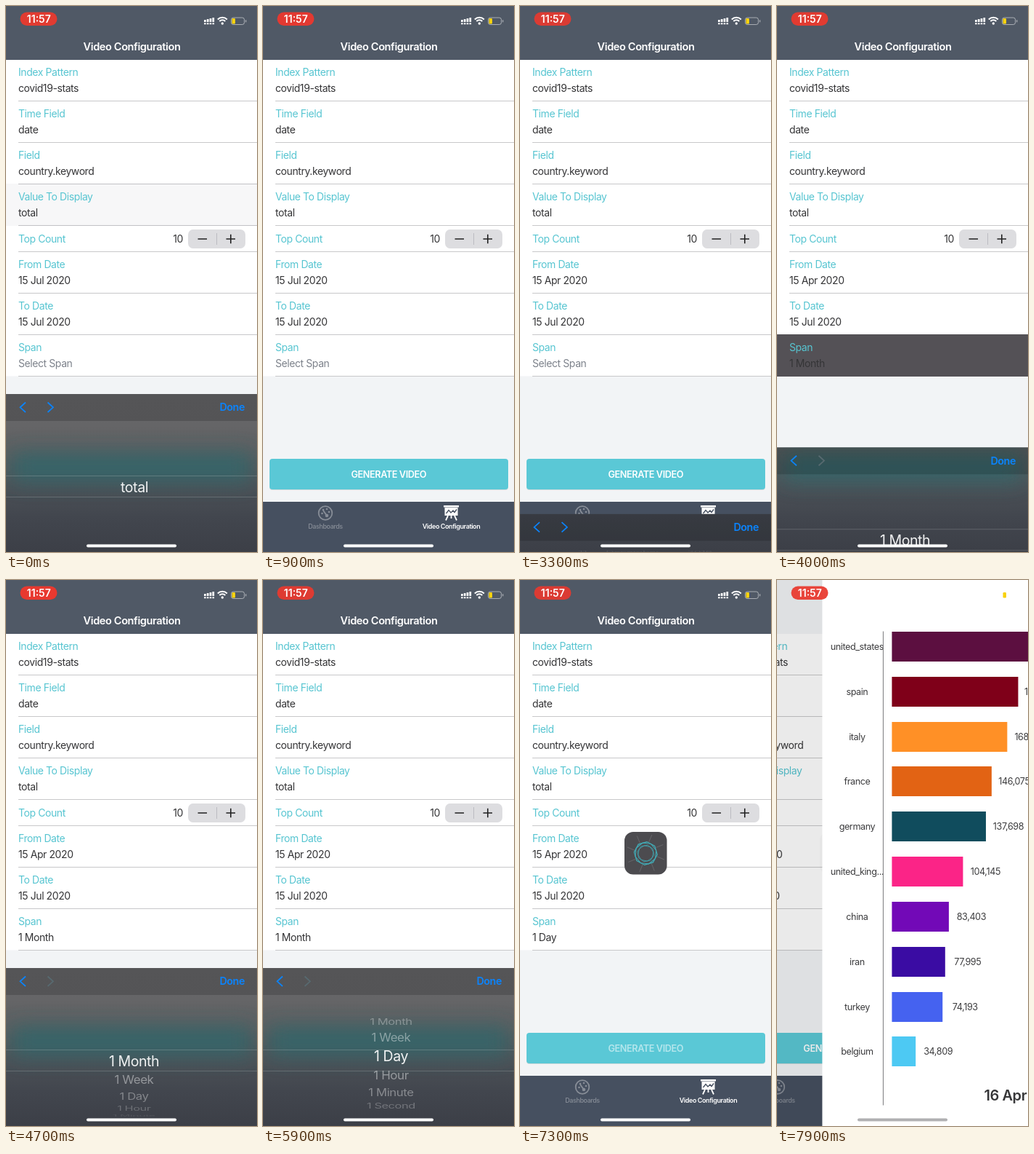
Write an HTML page that moves like this. It is 346x750 px and loops after 8 s.

```html
<!DOCTYPE html>
<html lang="en">
<head>
<meta charset="utf-8">
<title>Video Configuration</title>
<style>
html, body { margin: 0; width: 100%; height: 100%; overflow: hidden; background: #f2f4f6; }
svg { display: block; width: 346px; height: 750px; font-family: Inter, "Liberation Sans", sans-serif; letter-spacing: -.026em; }
</style>
</head>
<body>
<svg id="stage" viewBox="0 0 346 750" xmlns="http://www.w3.org/2000/svg"></svg>
<script>
const LOOP = 8000, W = 346, PANEL_H = 217, TEAL = '#57c5d1', BLUE = '#0a84ff';
const stage = document.getElementById('stage');
const clamp = (v, a = 0, b = 1) => Math.min(b, Math.max(a, v));
const ramp = (t, start, length) => clamp((t - start) / length);
const easeOut = (p, n) => 1 - (1 - p) ** n;
const smooth = p => p * p * (3 - 2 * p);

const rect = (x, y, w, h, fill, extra = '') =>
  `<rect x="${x}" y="${y}" width="${w}" height="${h}" fill="${fill}" ${extra}/>`;
const line = (d, color, width = 1, extra = '') =>
  `<path d="${d}" fill="none" stroke="${color}" stroke-width="${width}" ${extra}/>`;
const text = (s, x, y, size, fill, extra = '') =>
  `<text x="${x}" y="${y}" font-size="${size}" fill="${fill}" ${extra}>${s}</text>`;
const MID = 'text-anchor="middle"', END = 'text-anchor="end"', SEMI = 'font-weight="600"';

// Form rows: [label, top, initial value]
const rows = {
  index: ['Index Pattern', 74, 'covid19-stats'],
  time: ['Time Field', 131, 'date'],
  field: ['Field', 188, 'country.keyword'],
  value: ['Value To Display', 245, 'total'],
  from: ['From Date', 338, '15 Jul 2020'],
  to: ['To Date', 395, '15 Jul 2020'],
  span: ['Span', 452, 'Select Span'],
};

function formRow(id) {
  const [label, top, value] = rows[id];
  return line(`M17 ${top + 56.5}H${W}`, '#c8c8ca') +
    rect(0, top - 1, W, 58, '#545156', `id="${id}Glow" opacity="0"`) +
    text(label, 17, top + 22, 14, TEAL) +
    text(value, 17, top + 43.5, 14, '#353537', `id="${id}Text"`);
}

function form() {
  return rect(0, 74, W, 434.5, '#fff') + line(`M17 337.500H${W}`, '#c8c8ca') +
    Object.keys(rows).map(formRow).join('') +
    text('Top Count', 17, 325, 14, TEAL) + text('10', 244, 325, 14, '#353537', END) +
    rect(251, 307, 79, 26, '#dddde0', 'rx="7"') +
    line('M290.500 312V328', '#bcbcc1') +
    line('M264.500 320H277M303.500 320H316M309.800 313.800V326.200', '#222', 1.6);
}

function tabBar() {
  const grey = '#878d97';
  const dots = [[81.5, 697], [83, 692], [88, 691], [91, 695]]
    .map(([x, y]) => `<circle cx="${x}" cy="${y}" r="1.3" fill="${grey}"/>`).join('');
  return rect(0, 681, W, 69, '#465060') +
    `<circle cx="86" cy="696.5" r="9.3" fill="none" stroke="${grey}" stroke-width="1.8"/>` + dots +
    line('M83 693L88 700', grey, 2) + `<circle cx="88" cy="700" r="2.3" fill="${grey}"/>` +
    text('Dashboards', 86, 718, 9, grey, MID + ' font-weight="500"') +
    rect(249, 686, 21, 2.5, '#fff') + rect(250.5, 689, 18, 11, '#fff') +
    line('M252.500 697L256 692.500L259 696L262 693L264 695.500L267 691.500', '#465060', 1.4) +
    line('M255 700L252 706.500M259.500 700V704M264 700L267 706.500', '#fff', 1.8) +
    text('Video Configuration', 259.5, 718, 9, '#fff', MID + ' ' + SEMI);
}

function polygon(radius, turn) {
  return 'M' + Array.from({ length: 8 }, (_, i) => {
    const a = turn + i * Math.PI / 4;
    return `${(radius * Math.cos(a)).toFixed(2)} ${(radius * Math.sin(a)).toFixed(2)}`;
  }).join('L') + 'Z';
}

function loader() {
  let rays = '';
  for (let i = 0; i < 8; i++) rays += `<path d="M14 -8L24 -12" stroke="#77777b" stroke-width=".6" transform="rotate(${i * 45})"/>`;
  return `<g id="loader">${rect(144, 346, 58.5, 58.5, '#4c4b4f', 'rx="12"')}
    <g transform="translate(173.3 375.5)"><g id="spinner">${rays}
    ${line(polygon(16, .1), '#42aeb9', 1.2)}${line(polygon(15, .5), '#42aeb9', 1)}
    ${line(polygon(11.5, .2), '#42aeb9', .8)}${line(polygon(10.8, .6), '#42aeb9', .7)}</g></g></g>`;
}

function statusBar() {
  const bars = [0, 1, 2, 3].map(i =>
    rect(273 + i * 3.8, 19 - i, 2.7, 3 + i, '#fff', 'rx=".6"') +
    rect(273 + i * 3.8, 23.3, 2.7, 2, '#fff', 'rx=".6"')).join('');
  const arc = r => line(`M${298.3 - r * .72} ${25 - r * .72}A${r} ${r} 0 0 1 ${298.3 + r * .72} ${25 - r * .72}`, '#fff', 2);
  return rect(19.5, 8.5, 51, 18.5, '#e9392f', 'rx="9.2" id="pill"') +
    text('11:57', 45.3, 22.8, 14, '#fff', MID + ' letter-spacing="0" ' + SEMI) + bars + arc(9) + arc(5.5) +
    '<circle cx="298.3" cy="24" r="1.7" fill="#fff"/>' +
    rect(310.5, 16, 18, 9.5, 'none', 'rx="2.8" stroke="#fff" stroke-opacity=".5"') +
    rect(330, 19, 1.3, 3.5, '#fff', 'rx=".7" opacity=".5"') +
    rect(311.5, 17, 4.5, 7.5, '#f8d20e', 'rx="1.3"');
}

const countries = [
  ['united_states', 667801, '#5c0f40'], ['spain', 184948, '#7f0019'],
  ['italy', 168941, '#ff9026'], ['france', 146075, '#e26314'],
  ['germany', 137698, '#104c5d'], ['united_king...', 104145, '#fb2487'],
  ['china', 83403, '#7209b7'], ['iran', 77995, '#3a0ca3'],
  ['turkey', 74193, '#4562f0'], ['belgium', 34809, '#4dc9f3'],
];

function chart() {
  return rect(0, 0, W, 750, '#fff') + countries.map(([name, total, color], i) => {
    const y = Math.round(70.8 + i * 61.85), w = total * .000941;
    return text(name, 48, y + 25, 12.6, '#3c3c3e', MID) + rect(96, y, w, 41, color) +
      text(total.toLocaleString('en-US'), 96 + w + 31, y + 25, 12.6, '#3c3c3e', MID);
  }).join('') + line('M84 70.500V721.500', '#77777a') +
    text('16 Apr 2020', 223, 715, 20, '#363638', SEMI);
}

stage.innerHTML = `
<defs>
  <linearGradient id="shade" gradientUnits="userSpaceOnUse" x1="0" y1="533" x2="0" y2="750">
    <stop offset="0" stop-color="#666668"/><stop offset=".2" stop-color="#656567"/>
    <stop offset=".38" stop-color="#5b5e60"/><stop offset=".6" stop-color="#4b5056"/>
    <stop offset=".78" stop-color="#42464e"/><stop offset="1" stop-color="#3c3f47"/>
  </linearGradient>
  <filter id="blur" x="-30%" y="-200%" width="160%" height="500%"><feGaussianBlur stdDeviation="14"/></filter>
  <clipPath id="panelClip"><rect id="panelBox" x="0" y="533" width="346" height="217"/></clipPath>
</defs>
${rect(0, 0, W, 750, '#f2f4f6')}
<g id="oldPage">
  ${form()}
  ${rect(9, 623, 329, 42, '#8aa', 'rx="4" opacity=".35"')}
  ${rect(9, 622, 329, 42, '#5ac8d6', 'rx="4"')}
  ${text('GENERATE VIDEO', 173.3, 647.6, 12.7, '#fff', MID + ' ' + SEMI + ' id="generate"')}
  ${tabBar()}${loader()}
</g>
${rect(0, 0, W, 750, '#000', 'id="dim" opacity="0"')}
<g id="nav">${rect(0, 0, W, 74, '#505966')}${text('Video Configuration', 173.5, 60.5, 14.6, '#fff', MID + ' ' + SEMI)}</g>
<g id="panel" clip-path="url(#panelClip)">
  ${rect(0, 533, W, PANEL_H, 'url(#shade)')}
  ${rect(8, 614, 330, 40, '#30666b', 'filter="url(#blur)" opacity=".9"')}
  <g id="sheet">
    ${rect(0, 533, W, 37, '#000', 'opacity=".17"')}
    ${line('M27 544.500L19.500 551.300L27 558', BLUE, 1.7)}
    ${line('M57.500 544.500L65 551.300L57.500 558', BLUE, 1.7, 'id="next"')}
    ${text('Done', 329, 556.3, 14.3, BLUE, END + ' ' + SEMI + ' id="done"')}
    ${line(`M0 645.500H${W}M0 674.500H${W}`, '#fff', 1, 'opacity=".17"')}
    <g id="wheels"></g>
  </g>
</g>
<g id="chart">${chart()}</g>
${statusBar()}
${rect(111, 739.5, 124, 4, '#fff', 'rx="2" id="home"')}`;

const el = {};
stage.querySelectorAll('[id]').forEach(node => el[node.id] = node);
const set = (id, name, value) => el[id].setAttribute(name, value);
const show = (id, visible) => set(id, 'display', visible ? 'inline' : 'none');
const label = (id, value) => { if (el[id].textContent !== value) el[id].textContent = value; };

const months = ['January', 'February', 'March', 'April', 'May', 'June', 'July',
  'August', 'September', 'October', 'November', 'December'];
const spans = ['1 Month', '1 Week', '1 Day', '1 Hour', '1 Minute', '1 Second'];

// One column of the picker, wrapped on a cylinder
function wheel(item, pos, x, anchor) {
  let out = '';
  for (let i = Math.ceil(pos - 4.3); i <= pos + 4.3; i++) {
    const s = item(i);
    if (!s) continue;
    const d = i - pos, angle = d * .341, c = Math.cos(angle);
    const mid = Math.abs(d) < .5, k = 1 - .09 * (1 - c);
    const y = 660.5 + 77 * Math.sin(angle);
    out += `<g transform="translate(173 ${y.toFixed(2)}) scale(${k.toFixed(3)} ${(k * c).toFixed(3)})">` +
      text(s, x - 173, mid ? 7 : 6, mid ? 19.5 : 17, '#fff',
        `text-anchor="${anchor}" opacity="${mid ? .93 : (.45 * c).toFixed(3)}"`) + '</g>';
  }
  return out;
}

const monthPos = t => 6 - 3 * smooth(ramp(t, 2000, 750));
const spanPos = t => 2.24 * smooth(ramp(t, 4750, 1150)) - .24 * smooth(ramp(t, 5900, 250));

const pickers = [
  { open: -600, close: 350, draw: () => wheel(i => i === 0 && 'total', 0, 177, 'middle') },
  { open: 1467, close: 3150, draw: t =>
    wheel(i => String(i), 15, 86, 'end') +
    wheel(i => months[(i + 12) % 12], monthPos(t), 114, 'start') +
    wheel(i => String(i), 2020, 253.5, 'middle') },
  { open: 3894, close: 6400, last: true, draw: t => wheel(i => spans[i], spanPos(t), 176.5, 'middle') },
];

function drawPanel(t) {
  const picker = pickers.find(p => t >= p.open && t < p.close + 400);
  show('panel', !!picker);
  if (!picker) return;
  const offset = PANEL_H * (1 - easeOut(ramp(t, picker.open, 450), 4) + easeOut(ramp(t, picker.close, 400), 3));
  set('panelBox', 'y', 533 + offset);
  set('sheet', 'transform', `translate(0 ${offset.toFixed(2)})`);
  set('next', 'stroke', picker.last ? '#586a70' : BLUE);
  set('done', 'opacity', Math.abs(t - picker.close) < 100 ? .4 : 1);
  el.wheels.innerHTML = picker.draw(t);
}

function render(t) {
  set('valueGlow', 'opacity', .045 * (1 - ramp(t, 0, 200)));
  set('fromGlow', 'opacity', ramp(t, 1370, 60) * (1 - ramp(t, 1560, 220)));
  set('spanGlow', 'opacity', ramp(t, 3790, 60) * (1 - ramp(t, 4050, 350)));

  label('fromText', t < 2800 ? '15 Jul 2020' : '15 Apr 2020');
  label('spanText', t < 3894 ? 'Select Span' : t < 6150 ? '1 Month' : '1 Day');
  set('spanText', 'fill', t < 3894 ? '#7d828b' : '#353537');
  drawPanel(t);

  set('generate', 'opacity', t > 7000 && t < 7600 ? .55 : 1);
  set('loader', 'opacity', ramp(t, 7000, 200) * (1 - ramp(t, 7600, 310)));
  set('spinner', 'transform', `rotate(${((t - 7300) * .12).toFixed(1)})`);

  const push = easeOut(ramp(t, 7650, 577), 3);
  show('nav', push === 0);
  set('oldPage', 'transform', `translate(${(-.3 * W * push).toFixed(2)} 0)`);
  set('chart', 'transform', `translate(${(W * (1 - push)).toFixed(2)} 0)`);
  set('dim', 'opacity', .1 * push);
  set('home', 'fill', push > .5 ? '#b0b0b2' : '#fff');
  set('pill', 'opacity', .95 + .05 * Math.sin(t / 1000 * Math.PI));
}

const begin = performance.now();
function tick() {
  render((performance.now() - begin) % LOOP);
  requestAnimationFrame(tick);
}
tick();
</script>
</body>
</html>
```
